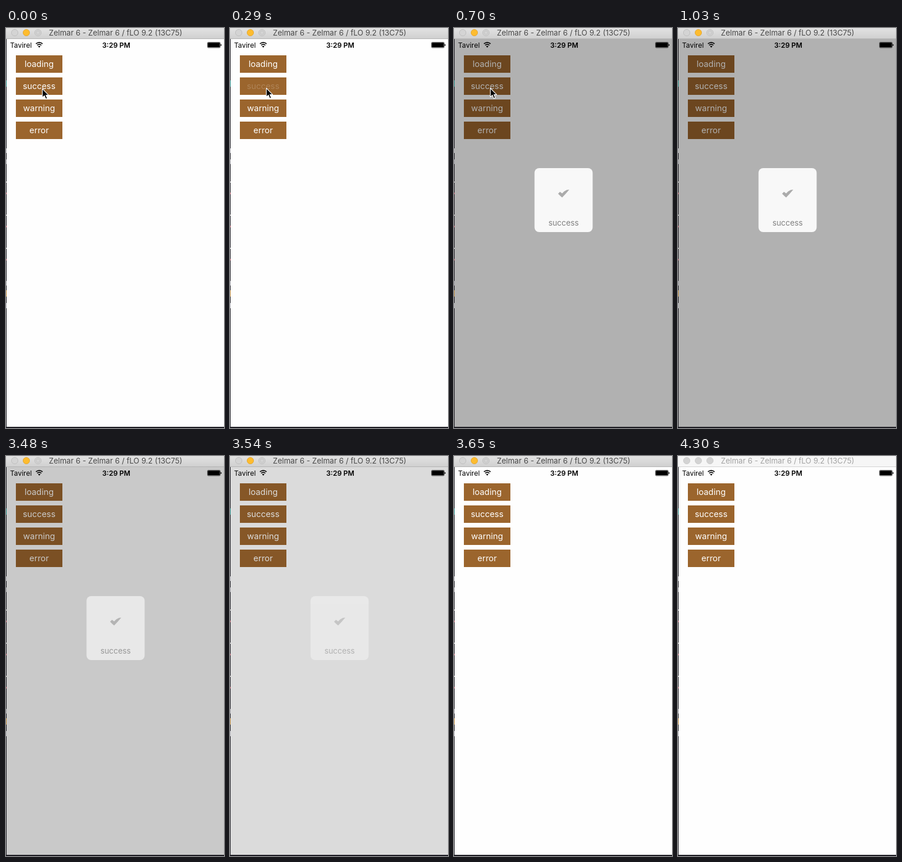
Recreate the animation shown at these times as an HTML page. Size 375 px wide and 688 px high, loop 4.42 s.

```html
<!DOCTYPE html>
<html lang="en">
<head>
<meta charset="utf-8">
<title>Success toast</title>
<style>
  html, body { margin: 0; width: 100%; height: 100%; overflow: hidden; background: #1c1b22; }
  svg { display: block; width: 375px; height: 688px; }
  text { font-family: Inter, Roboto, sans-serif; text-anchor: middle; }
</style>
</head>
<body>
<svg viewBox="0 0 375 688" xmlns="http://www.w3.org/2000/svg">
  <defs>
    <linearGradient id="bar" x1="0" y1="0" x2="0" y2="1">
      <stop offset="0" stop-color="#e2e2e2"/>
      <stop offset="1" stop-color="#d0d0d0"/>
    </linearGradient>
  </defs>
  <rect width="375" height="688" fill="#1c1b22"/>
  <g id="edge"></g>
  <rect x="1" y="18" width="374" height="668" fill="#fefefe"/>

  <g id="buttons" font-size="14.4" fill="#fff"></g>
  <rect id="shade" x="1" y="19" width="374" height="667" opacity="0"/>

  <g id="status">
    <text x="7" y="33.5" font-size="12" style="text-anchor:start">Tavirel</text>
    <g fill="none" stroke="#000" stroke-width="1.7">
      <path d="M51.5 27.2Q57.2 22.4 62.9 27.2"/>
      <path d="M53.6 29.6Q57.2 26.6 60.8 29.6"/>
    </g>
    <path d="M55.1 31.6Q57.2 29.9 59.3 31.6L57.2 33.8Z"/>
    <text x="189.7" y="33.5" font-size="12" font-weight="600">3:29 PM</text>
    <rect x="346.5" y="24.5" width="22" height="9.5" rx="1.6" fill="none" stroke="#000" stroke-width=".6"/>
    <rect x="347.2" y="25.2" width="20.6" height="8.1" rx="1"/>
    <path d="M369.2 27.5Q370.8 28 370.8 29.2Q370.8 30.5 369.2 31Z"/>
  </g>

  <g id="toast" opacity="0">
    <rect id="panel" x="138.5" y="241" width="100" height="110" rx="8" fill="#f8f8f8"/>
    <path d="M179 285L182.3 281.8L186 284.6L189.5 281L194 278.6L198.3 278L192 285.2L186 291.6L183 289Z" fill="#ababab"/>
    <text x="188.5" y="340.3" font-size="13.4" fill="#808080">success</text>
  </g>

  <rect id="title" x="0" y="0" width="375" height="18"/>
  <rect id="rule" x="0" y="18" width="375" height="1"/>
  <g id="lights"></g>
  <text id="name" x="188.5" y="13.2" font-size="13">Zelmar 6 - Zelmar 6 / fLO 9.2 (13C75)</text>

  <path id="cursor" d="M0 0V15.2L3.5 12L6 17.8L8.6 16.7L6.2 11.1H10.9Z" stroke="#fff" stroke-width="1.1" stroke-linejoin="round"/>
</svg>
<script>
const LOOP = 4420;
const $ = id => document.getElementById(id);

function add(parent, tag, attrs, text) {
  const el = document.createElementNS('http://www.w3.org/2000/svg', tag);
  set(el, attrs);
  if (text) el.textContent = text;
  return parent.appendChild(el);
}
function set(el, attrs) {
  for (const key in attrs) el.setAttribute(key, attrs[key]);
}

const labels = ['loading', 'success', 'warning', 'error'].map((word, i) => {
  const y = 47 + i * 38;
  add($('buttons'), 'rect', { x: 17, y, width: 80, height: 30, fill: '#9b652d' });
  return add($('buttons'), 'text', { x: 57, y: y + 20.3 }, word);
});

const lights = [15, 35, 55].map(cx => add($('lights'), 'circle', { cx, cy: 8, r: 5.6 }));
const ring = add($('lights'), 'circle', { cx: 55, cy: 8, r: 3.2, fill: 'none', stroke: '#c3c3c3' });

// Slivers of the window behind, along the left edge
[[90, 11, '#1e8a86'], [207, 8, '#b8b8be'], [226, 8, '#a0a0a8'], [264, 2, '#c8c8c8'],
 [283, 3, '#a84858'], [321, 2, '#c8c8c8'], [340, 3, '#a84858'], [378, 2, '#c8c8c8'],
 [397, 3, '#a84858'], [435, 8, '#a0a0a8'], [451, 11, '#c08a38'], [473, 9, '#b8b8be']
].forEach(([y, height, fill]) => add($('edge'), 'rect', { x: 0, y, width: 1, height, fill }));

// Last value whose start time has passed
function step(t, keys) {
  let value = keys[0][1];
  for (const [at, v] of keys) if (t >= at) value = v;
  return value;
}

const toastKeys = [[0, 0], [470, 1], [3480, .68], [3540, .45], [3590, .18], [3650, 0]];
const labelKeys = [[0, 1], [290, .2], [520, .4], [580, .6], [640, .8], [700, 1]];
const cursorKeys = [[0, [62.5, 104.5]], [50, [62.5, 103.5]], [870, [48.5, 102.5]],
                    [920, [150, 128]], [980, [315.5, 160.5]], [1030, null]];

function draw(t) {
  const shown = step(t, toastKeys);
  set($('shade'), { opacity: shown * .306 });
  set($('toast'), { opacity: shown });
  set(labels[1], { 'fill-opacity': step(t, labelKeys) });

  const spot = step(t, cursorKeys);
  set($('cursor'), spot
    ? { visibility: 'visible', transform: `translate(${spot})` }
    : { visibility: 'hidden' });

  const active = t < 4300;
  set($('title'), { fill: active ? 'url(#bar)' : '#f6f6f6' });
  set($('rule'), { fill: active ? '#b4b4b4' : '#d2d2d2' });
  set($('name'), { fill: active ? '#484848' : '#a2a2a2' });
  lights.forEach((light, i) => {
    const lit = active && i === 1;
    set(light, {
      fill: lit ? '#fdbc2f' : active ? '#d4d4d4' : '#d3d3d3',
      stroke: lit ? '#e0a028' : active ? '#b9b9b9' : '#c6c6c6',
      'stroke-width': .8
    });
  });
  set(ring, { visibility: active ? 'visible' : 'hidden' });
}

const start = performance.now();
function tick() {
  draw((performance.now() - start) % LOOP);
  requestAnimationFrame(tick);
}
tick();
</script>
</body>
</html>
```
